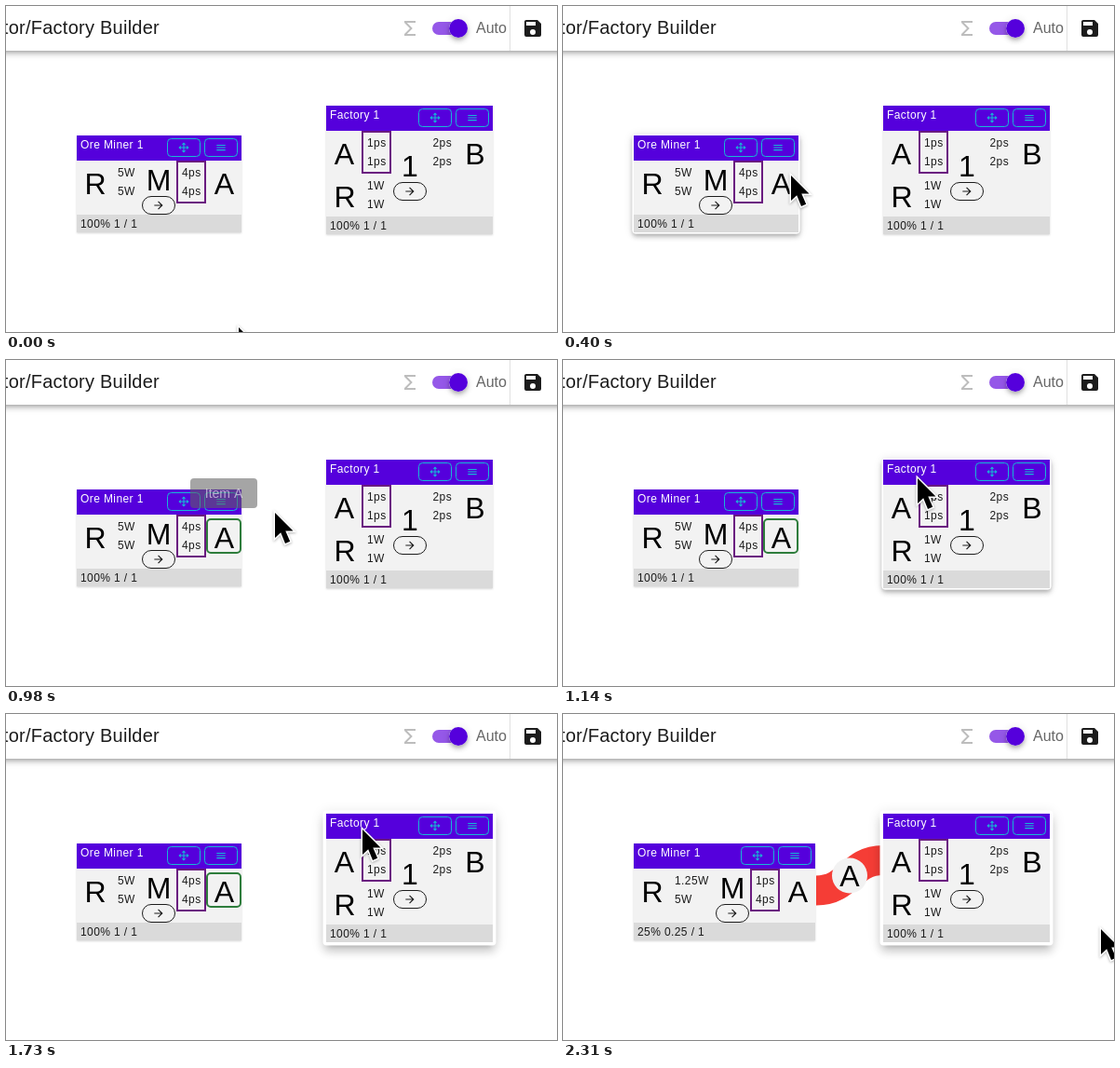
These frames come from a looping animation (592 px wide and 350 px high, 2.39 s). An HTML page with a canvas:

```html
<!DOCTYPE html>
<html lang="en">
<head>
<meta charset="utf-8">
<title>Factory Builder</title>
<style>
  html, body { margin: 0; width: 100%; height: 100%; overflow: hidden; background: #fff; }
  canvas { display: block; }
</style>
</head>
<body>
<canvas id="stage" width="592" height="350"></canvas>
<script>
const ctx = document.getElementById('stage').getContext('2d');
const LOOP = 2390;
const FONT = '"Liberation Sans", Arial, sans-serif';
const PURPLE = '#5500dc', CYAN = '#16b9d6', INK = '#1c1c1c', PAPER = '#f2f2f2';

const ICON = {
  sigma: 'M18,6H8.83L14.83,12L8.83,18H18V20H6V18L12,12L6,6V4H18Z',
  save: 'M15,9H5V5H15M12,19A3,3 0 0,1 9,16A3,3 0 0,1 12,13A3,3 0 0,1 15,16A3,3 0 0,1 12,19M17,3H5C3.89,3 3,3.9 3,5V19A2,2 0 0,0 5,21H19A2,2 0 0,0 21,19V7Z',
  move: 'M13,6V11H18V7.75L22.25,12L18,16.25V13H13V18H16.25L12,22.25L7.75,18H11V13H6V16.25L1.75,12L6,7.75V11H11V6H7.75L12,1.75L16.25,6Z',
  menu: 'M3,6H21V8H3ZM3,11H21V13H3ZM3,16H21V18H3Z',
  arrow: 'M4,11V13H16L10.5,18.5L11.92,19.92L19.84,12L11.92,4.08L10.5,5.5L16,11Z'
};
for (const name in ICON) ICON[name] = new Path2D(ICON[name]);
const POINTER = new Path2D('M0,0V27L6.2,21.3L11,33L16.2,30.8L11.3,19.5H19.5Z');

// Shadow layers: [offset y, blur, spread, alpha]
const REST = [[1, 2, 0, 0.16]];
const HOVER = [[2, 4, -1, 0.2], [4, 5, 0, 0.14], [1, 10, 0, 0.12]];
const RAISED = [[5, 5, -3, 0.2], [8, 10, 1, 0.14], [3, 14, 2, 0.12]];

// Pointer positions, each held until the next: [ms, x, y]
const POINTER_PATH = [
  [0, 250, 345], [80, 251, 305], [160, 252, 245], [240, 253, 200],
  [320, 248, 189], [400, 245, 182], [900, 259, 177], [980, 289, 164],
  [1060, 338, 145], [1140, 381, 127], [1390, 383, 124],
  [2230, 470, 172], [2310, 578, 231]
];
// Tooltip steps: [ms, scale, opacity]
const TOOLTIP = [
  [0, 0, 0], [740, 0.2, 0.9], [820, 0.85, 0.9], [900, 1, 0.9],
  [980, 1, 0.57], [1060, 1, 0.1], [1140, 0, 0]
];

const held = (steps, t) => steps.filter(step => step[0] <= t).pop();

function text(str, x, y, size = 12, color = INK, align = 'left', spacing = 0) {
  ctx.font = `${size}px ${FONT}`;
  ctx.letterSpacing = spacing + 'px';
  ctx.textAlign = align;
  ctx.fillStyle = color;
  ctx.fillText(str, x, y);
}
const caption = (str, x, y, color) => text(str, x, y, 12, color, 'left', 0.4);
const letter = (str, x, y) => text(str, x, y, 32, '#000', 'center');

function rect(x, y, w, h, color) {
  ctx.fillStyle = color;
  ctx.fillRect(x, y, w, h);
}

function roundPath(x, y, w, h, r) {
  ctx.beginPath();
  ctx.roundRect(x, y, w, h, r);
}

function outline(x, y, w, h, r, color, width = 1) {
  roundPath(x + width / 2, y + width / 2, w - width, h - width, r);
  ctx.strokeStyle = color;
  ctx.lineWidth = width;
  ctx.stroke();
}

function disc(x, y, r, color) {
  ctx.beginPath();
  ctx.arc(x, y, r, 0, 7);
  ctx.fillStyle = color;
  ctx.fill();
}

function icon(name, cx, cy, size, color) {
  ctx.save();
  ctx.translate(cx - size / 2, cy - size / 2);
  ctx.scale(size / 24, size / 24);
  ctx.fillStyle = color;
  ctx.fill(ICON[name], 'evenodd');
  ctx.restore();
}

function castShadow(x, y, w, h, r, layers) {
  ctx.save();
  ctx.fillStyle = '#fff';
  for (const [dy, blur, spread, alpha] of layers) {
    ctx.shadowColor = `rgba(0,0,0,${alpha})`;
    ctx.shadowOffsetY = dy;
    ctx.shadowBlur = blur;
    roundPath(x - spread, y - spread, w + 2 * spread, h + 2 * spread, r);
    ctx.fill();
  }
  ctx.restore();
}

function appBar() {
  castShadow(-20, -20, 632, 68, 0, HOVER);
  rect(0, 0, 592, 48, '#fff');
  text('ator/Factory Builder', 165, 30, 20, INK, 'right', 0.25);
  icon('sigma', 434, 24, 24, '#bdbdbd');
  roundPath(458, 17, 34, 14, 7);
  ctx.fillStyle = '#9558e8';
  ctx.fill();
  castShadow(476, 14, 20, 20, 10, HOVER);
  disc(486, 24, 10, PURPLE);
  text('Auto', 505, 29, 16, '#666');
  rect(541, 0, 1, 48, '#e0e0e0');
  icon('save', 566, 24, 24, INK);
}

function headerButton(x, y, name, size) {
  outline(x, y, 36, 20, 4, CYAN);
  icon(name, x + 18, y + 10, size, CYAN);
}

function card(x, y, w, h, title, status, layers) {
  if (layers === REST) castShadow(x, y, w, h, 0, layers);
  else castShadow(x - 1.5, y - 1.5, w + 3, h + 3, 4, layers);
  rect(x, y, w, h, PAPER);
  rect(x, y, w, 27, PURPLE);
  rect(x, y + h - 19, w, 19, '#dadada');
  caption(title, x + 4, y + 14, '#fff');
  caption(status, x + 4, y + h - 5);
  headerButton(x + w - 80, y + 3, 'move', 13);
  headerButton(x + w - 40, y + 3, 'menu', 12.5);
}

function rates(x, y, top, bottom, boxed) {
  caption(top, x, y);
  caption(bottom, x, y + 20);
  if (boxed) outline(x - 6, y - 17, 32, 46, 0, '#6a1b80', 2);
}

function pill(cx, cy) {
  outline(cx - 18, cy - 10, 36, 20, 10, INK);
  icon('arrow', cx, cy, 14, INK);
}

function miner(linked, selected, layers) {
  const shift = linked ? 18 : 0;
  card(76, 139, 177 + shift, 104, 'Ore Miner 1', linked ? '25% 0.25 / 1' : '100% 1 / 1', layers);
  letter('R', 96, 202);
  rates(120, 183, linked ? '1.25W' : '5W', '5W');
  letter('M', 164 + shift, 198);
  pill(164 + shift, 214);
  rates(189 + shift, 183, linked ? '1ps' : '4ps', '4ps', true);
  letter('A', 234.5 + shift, 202);
  if (selected) outline(215, 170, 38, 38, 4, '#2e7d3c', 2);
}

function factory(layers) {
  card(344, 107, 179, 138, 'Factory 1', '100% 1 / 1', layers);
  letter('A', 363.5, 170);
  rates(388, 151, '1ps', '1ps', true);
  letter('1', 434, 183);
  pill(434, 199);
  rates(458.5, 151, '2ps', '2ps');
  letter('B', 504, 170);
  letter('R', 364, 216);
  rates(388, 197, '1W', '1W');
}

function belt() {
  ctx.beginPath();
  ctx.moveTo(272, 189.5);
  ctx.bezierCurveTo(308, 189.5, 308, 157, 344, 157);
  ctx.strokeStyle = '#f53d36';
  ctx.lineWidth = 32;
  ctx.stroke();
  disc(308, 173.5, 19, PAPER);
  letter('A', 308, 185);
}

function tooltip(scale, opacity) {
  if (!opacity) return;
  ctx.save();
  ctx.globalAlpha = opacity;
  ctx.translate(234, 158);
  ctx.scale(scale, scale);
  roundPath(-36, -31, 72, 32, 4);
  ctx.fillStyle = '#616161';
  ctx.fill();
  text('Item A', 0, -10, 14, '#fff', 'center');
  ctx.restore();
}

function pointer(x, y) {
  ctx.save();
  ctx.translate(x, y);
  ctx.shadowColor = 'rgba(0,0,0,.3)';
  ctx.shadowBlur = 3;
  ctx.shadowOffsetY = 1;
  ctx.strokeStyle = '#fff';
  ctx.lineWidth = 3;
  ctx.stroke(POINTER);
  ctx.shadowColor = 'transparent';
  ctx.fillStyle = '#000';
  ctx.fill(POINTER);
  ctx.restore();
}

function draw(t) {
  const between = (from, to) => t >= from && t < to;
  const linked = t >= 1980;
  rect(0, 0, 592, 350, '#fff');
  appBar();
  if (linked) belt();
  miner(linked, between(740, 1810), between(240, 900) ? HOVER : REST);
  factory(t >= 1730 ? RAISED : t >= 1140 ? HOVER : REST);
  const [, scale, opacity] = held(TOOLTIP, t);
  tooltip(scale, opacity);
  const [, x, y] = held(POINTER_PATH, t);
  pointer(x, y);
}

const start = performance.now();
function tick() {
  draw((performance.now() - start) % LOOP);
  requestAnimationFrame(tick);
}
tick();
</script>
</body>
</html>
```
